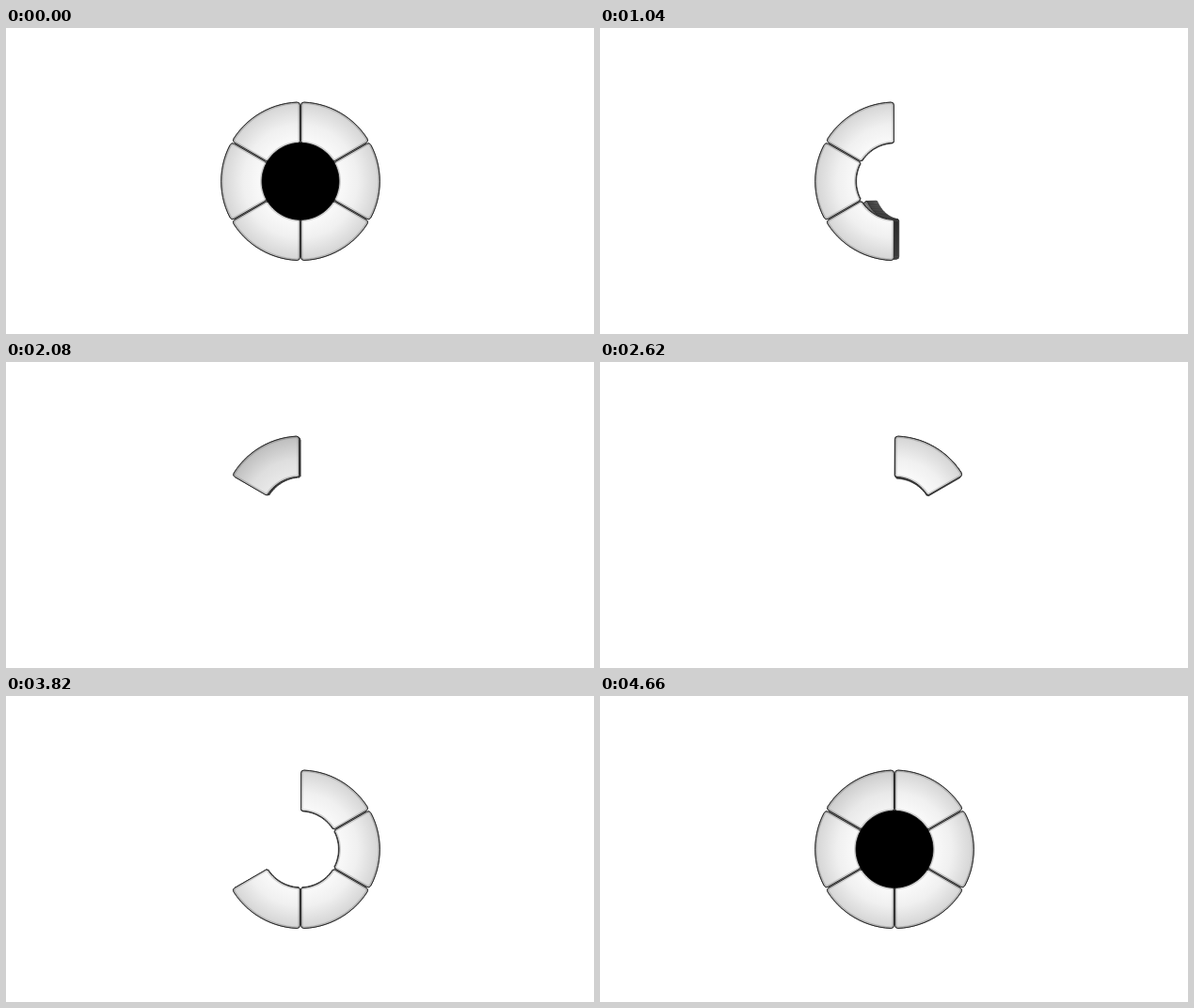
Animation of 625x326 px, one loop 4.7 s. Source, as an HTML page with a canvas:

```html
<!DOCTYPE html>
<html lang="en">
<head>
<meta charset="utf-8">
<title>Folding ring</title>
<style>
  html, body { margin: 0; width: 100%; height: 100%; overflow: hidden; background: #fff; }
  canvas { display: block; }
</style>
</head>
<body>
<canvas id="stage" width="625" height="326"></canvas>
<script>
const ctx = document.getElementById('stage').getContext('2d');
const CX = 313, CY = 163.3, OUTER = 84.3, INNER = 41;
const HALF_DEPTH = 7.5, CAMERA = 900;
const LOOP = 4700, FOLD = 400, UNFOLD = 440, UNFOLD_START = 2525;
const SEALED = 12;            // degrees of opening below which the hole stays black
const RAD = Math.PI / 180;

const ease = p => p < .5 ? 4 * p ** 3 : 1 - 4 * (1 - p) ** 3;
const clamp = p => Math.min(1, Math.max(0, p));
const grey = v => `rgb(${v},${v},${v})`;

// Point at a bearing (clockwise from the top) and radius around the ring's centre.
const polar = (deg, r) => [r * Math.sin(deg * RAD), -r * Math.cos(deg * RAD)];

// Rounded outline of the 60 degree segment that starts at the given bearing.
function outline(start) {
  const points = [];
  const add = (side, r, inset) => {
    const margin = Math.asin((.6 + inset) / r) / RAD;
    points.push(polar(start + (side ? 60 - margin : margin), r));
  };
  const arc = (from, to, r) => {
    for (let i = 0; i <= 14; i++) points.push(polar(start + from + (to - from) * i / 14, r));
  };
  add(0, OUTER - 3.2, 0);
  add(0, OUTER - .9, .8);
  arc(2.6, 57.4, OUTER);
  add(1, OUTER - .9, .8);
  add(1, OUTER - 3.2, 0);
  add(1, INNER + 1.6, 0);
  arc(57.2, 2.8, INNER);
  add(0, INNER + 1.6, 0);
  return points;
}

// Turns a slab face about the radial hinge, swinging behind the ring, and projects it.
function project(points, depth, hinge, angle) {
  const [ux, uy] = polar(hinge, 1);
  const c = Math.cos(angle * RAD), s = Math.sin(angle * RAD);
  return points.map(([x, y]) => {
    const along = x * ux + y * uy;
    const across = y * ux - x * uy;
    const side = across * c - depth * s;
    const z = -across * s - depth * c;
    const scale = CAMERA / (CAMERA + HALF_DEPTH - z * -1);
    return [CX + (along * ux - side * uy) * scale, CY + (along * uy + side * ux) * scale];
  });
}

function trace(points) {
  ctx.beginPath();
  points.forEach(([x, y]) => ctx.lineTo(x, y));
  ctx.closePath();
}

const area = points => points.reduce((sum, [x, y], i) => {
  const [nx, ny] = points[(i + 1) % points.length];
  return sum + x * ny - nx * y;
}, 0);

function drawFace(points, light) {
  const shade = ctx.createRadialGradient(CX, CY, INNER, CX, CY, OUTER);
  shade.addColorStop(0, grey(Math.round(250 * light)));
  shade.addColorStop(.45, grey(Math.round(240 * light ** 1.1)));
  shade.addColorStop(1, grey(Math.round(212 * light ** 1.7)));
  trace(points);
  ctx.fillStyle = shade;
  ctx.fill();
  ctx.save();
  ctx.clip();
  ctx.strokeStyle = 'rgba(0,0,0,.16)';
  ctx.lineWidth = 4;
  ctx.stroke();
  ctx.restore();
  ctx.strokeStyle = '#2a2a2a';
  ctx.lineWidth = 1;
  ctx.stroke();
}

function drawSlab(start, hinge, angle) {
  const shape = outline(start);
  const a = project(shape, HALF_DEPTH, hinge, angle);
  const b = project(shape, -HALF_DEPTH, hinge, angle);
  const wall = ctx.createRadialGradient(CX, CY, 22, CX, CY, OUTER);
  wall.addColorStop(0, '#5c5c5c');
  wall.addColorStop(.35, '#2c2c2c');
  wall.addColorStop(1, '#3c3c3c');
  ctx.fillStyle = ctx.strokeStyle = wall;
  ctx.lineWidth = .6;
  a.forEach((point, i) => {
    const j = (i + 1) % a.length;
    trace([point, a[j], b[j], b[i]]);
    ctx.fill();
    ctx.stroke();
  });
  const light = 1 - .65 * Math.abs(Math.sin(angle * RAD));
  // The front face keeps its winding; once turned over, the other face looks at us.
  if (area(a) > 0) drawFace(a, light);
  else if (area(b) < 0) drawFace(b, light);
}

function draw(time) {
  const folding = time < UNFOLD_START;
  const elapsed = folding ? time : time - UNFOLD_START;
  const length = folding ? FOLD : UNFOLD;
  const move = Math.min(folding ? 5 : 4, Math.floor(elapsed / length));
  const angle = 180 * ease(clamp(elapsed / length - move));
  const first = folding ? move + 1 : 0;
  const last = folding ? 5 : move;
  const closed = folding ? move === 0 && angle < SEALED
                         : move === 4 && angle > 180 - SEALED;

  ctx.fillStyle = '#fff';
  ctx.fillRect(0, 0, 625, 326);
  if (closed) {
    ctx.beginPath();
    ctx.arc(CX, CY, INNER + .8, 0, 2 * Math.PI);
    ctx.fillStyle = '#000';
    ctx.fill();
  }
  drawSlab(move * 60, (move + 1) * 60, angle);
  for (let i = first; i <= last; i++) drawSlab(i * 60, i * 60, 0);
  if (closed) {
    ctx.beginPath();
    ctx.arc(CX, CY, INNER, 0, 2 * Math.PI);
    ctx.fillStyle = '#000';
    ctx.fill();
  }
}

const began = performance.now();
function tick() {
  draw((performance.now() - began) % LOOP);
  requestAnimationFrame(tick);
}
tick();
</script>
</body>
</html>
```
